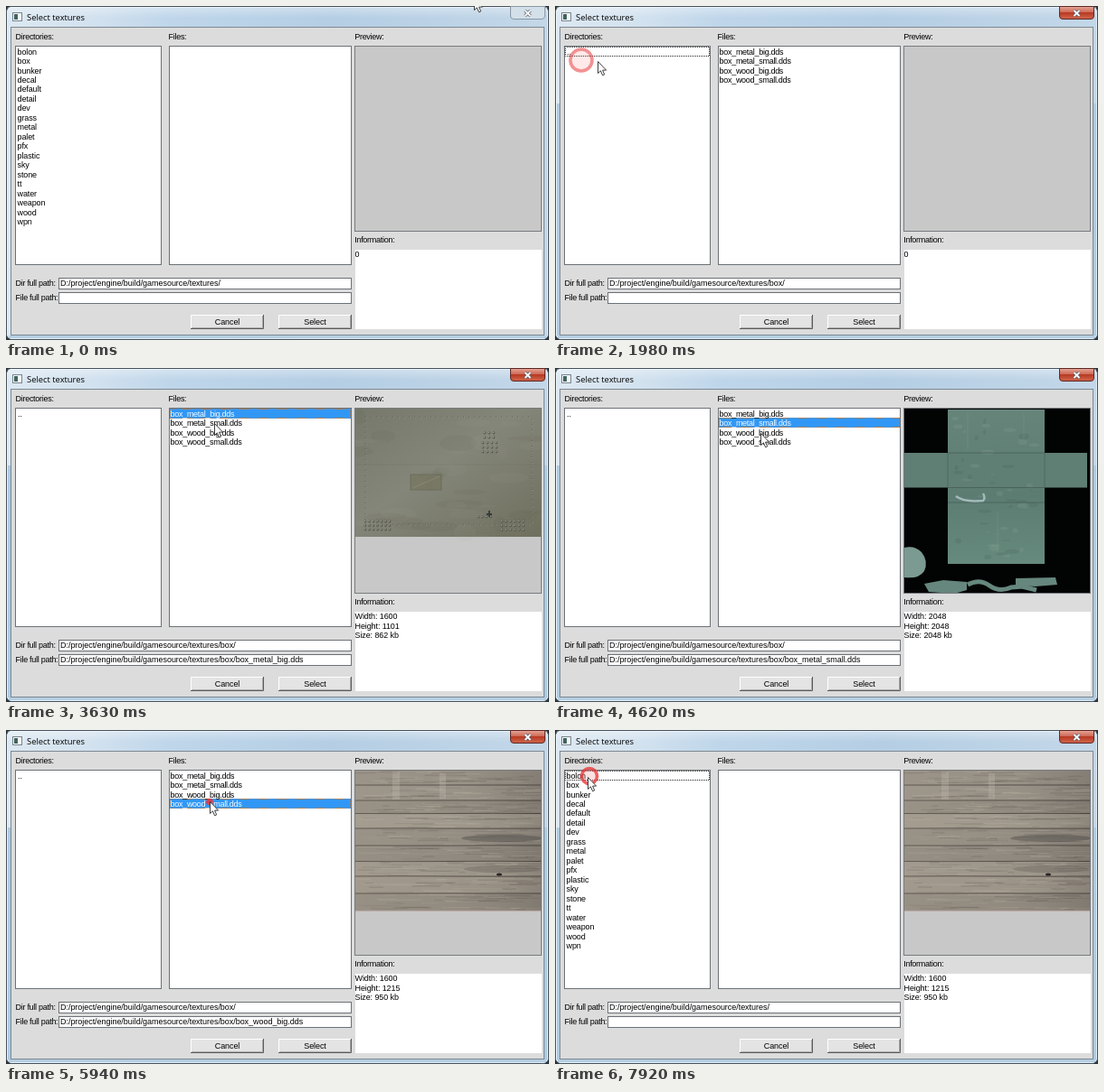
Recreate the animation shown at these times as an HTML page. Size 600 by 370 pixels, loop 8 s.

```html
<!DOCTYPE html>
<html lang="en">
<head>
<meta charset="utf-8">
<title>Select textures</title>
<style>
html, body { margin: 0; width: 100%; height: 100%; overflow: hidden; background: #2b343b; }
svg { display: block; width: 600px; height: 370px; }
text { font: 9px "Liberation Sans", Arial, sans-serif; fill: #000; white-space: pre; }
.title { font: 9.4px "Open Sans", "Noto Sans", sans-serif; }
.label { letter-spacing: -.28px; }
.dir { letter-spacing: -.1px; }
.path { letter-spacing: -.04px; }
.dots { fill: none; stroke-dasharray: 1 1; stroke-dashoffset: .5; }
</style>
</head>
<body>
<svg id="stage" viewBox="0 0 600 370" xmlns="http://www.w3.org/2000/svg">
<defs>
  <linearGradient id="bar">
    <stop offset="0" stop-color="#dce8f2"/><stop offset=".15" stop-color="#d3e2ef"/>
    <stop offset=".3" stop-color="#bfd6ea"/><stop offset=".6" stop-color="#b5cee4"/>
    <stop offset="1" stop-color="#c3d7e8"/>
  </linearGradient>
  <linearGradient id="gloss" x2="0" y2="1">
    <stop offset="0" stop-color="#fff" stop-opacity=".35"/><stop offset="1" stop-color="#fff" stop-opacity="0"/>
  </linearGradient>
  <linearGradient id="red" x2="0" y2="1">
    <stop offset="0" stop-color="#e5a698"/><stop offset=".45" stop-color="#cf6a57"/>
    <stop offset=".5" stop-color="#b83a24"/><stop offset="1" stop-color="#d0674c"/>
  </linearGradient>
  <linearGradient id="steel" x2="1" y2="1">
    <stop offset="0" stop-color="#75786a"/><stop offset=".45" stop-color="#838679"/>
    <stop offset="1" stop-color="#706f5e"/>
  </linearGradient>
  <linearGradient id="green" x2="0" y2="1">
    <stop offset="0" stop-color="#66847a"/><stop offset=".55" stop-color="#5c7c72"/>
    <stop offset="1" stop-color="#668a7d"/>
  </linearGradient>
  <linearGradient id="shade">
    <stop offset="0" stop-color="#cfc4b2" stop-opacity=".16"/>
    <stop offset=".5" stop-color="#cfc4b2" stop-opacity=".08"/>
    <stop offset="1" stop-color="#3a3430" stop-opacity=".16"/>
  </linearGradient>
  <clipPath id="view"><rect x="386" y="44" width="206" height="206"/></clipPath>
</defs>
</svg>
<script>
const STEP = 330, LOOP = 8000;
const svg = document.getElementById('stage');
const ROOT = 'D:/project/engine/build/gamesource/textures/';
const DIRS = 'bolon box bunker decal default detail dev grass metal palet pfx plastic sky stone tt water weapon wood wpn'.split(' ');
const FILES = ['metal_big', 'metal_small', 'wood_big', 'wood_small'].map(n => `box_${n}.dds`);
const rowY = i => 53.6 + i * 10.47;

const rect = (x, y, w, h, fill, more = '') =>
  `<rect x="${x}" y="${y}" width="${w}" height="${h}" fill="${fill}" ${more}/>`;
const line = (d, color, width = 1, more = '') =>
  `<path d="${d}" fill="none" stroke="${color}" stroke-width="${width}" ${more}/>`;
const text = (x, y, s, cls = 'label', more = '') =>
  `<text x="${x}" y="${y}" class="${cls}" ${more}>${s}</text>`;
const field = (x, y, w, h) => rect(x + .5, y + .5, w, h, '#fff', 'stroke="#6c7176"');
const group = (id, body, more = '') => `<g id="${id}" ${more}>${body}</g>`;

function random(seed) {
  return () => (seed = seed * 16807 % 2147483647) / 2147483647;
}

function button(x, w, label) {
  return rect(x, 342, w, 16, '#e4e4e4') +
    line(`M${x + .5} 357V342.5H${x + w - 1}`, '#fff') +
    line(`M${x} 357.5H${x + w - .5}V342`, '#5c5c5c') +
    line(`M${x + 1} 356.5H${x + w - 1.5}V343`, '#aaa') +
    text(x + w / 2, 353, label, 'dir', 'text-anchor="middle"');
}

function metalBig() {
  const rnd = random(71);
  let s = rect(386, 44, 206, 143, 'url(#steel)');
  for (let i = 0; i < 34; i++)
    s += `<ellipse cx="${386 + rnd() * 206}" cy="${44 + rnd() * 143}" rx="${4 + rnd() * 24}" ry="${1 + rnd() * 9}" fill="${rnd() < .5 ? '#a0a294' : '#57543e'}" opacity=".08"/>`;
  s += rect(397, 54, 184, 119, 'none', 'stroke="#5f6052" stroke-dasharray="1 5" opacity=".8"');
  s += rect(398, 55, 184, 119, 'none', 'stroke="#9b9d8f" stroke-dasharray="1 5" opacity=".6"');
  s += rect(447, 118, 34, 17, '#76745f', 'stroke="#5f5f4e" stroke-width=".8" opacity=".7"');
  s += line('M449 133L479 120', '#8f8f7d', .7);
  const rivets = (x, y, nx, ny, gap) => {
    for (let i = 0; i < nx * ny; i++) {
      const cx = x + i % nx * gap, cy = y + Math.floor(i / nx) * gap;
      s += `<circle cx="${cx}" cy="${cy}" r="1.4" fill="#56584d"/><circle cx="${cx - .4}" cy="${cy - .5}" r=".8" fill="#9d9f91"/>`;
    }
  };
  rivets(529, 72, 3, 2, 5);
  rivets(527, 83, 4, 3, 5);
  rivets(397, 170, 7, 3, 4.5);
  rivets(548, 170, 6, 3, 4.8);
  rivets(522, 165, 4, 1, 4.5);
  return s + line('M534 158V165M531 162H537', '#353b3c', 1.8) +
    line('M386 107H591', '#686a5c', .6, 'opacity=".4"');
}

function metalSmall() {
  const rnd = random(23);
  let s = rect(386, 44, 206, 206, '#020303') +
    rect(434, 46, 107, 171, 'url(#green)') + rect(386, 94, 202, 38.5, '#5f7e74');
  for (let i = 0; i < 46; i++)
    s += `<ellipse cx="${442 + rnd() * 90}" cy="${52 + rnd() * 158}" rx="${1 + rnd() * 7}" ry="${.5 + rnd() * 3}" fill="${rnd() < .5 ? '#93aaa3' : '#405b53'}" opacity=".18"/>`;
  s += line('M434 94H541M434 132.5H541M434 149H541', '#465f56', .8) +
    line('M434 94V132M541 94V132', '#49645b', .7) +
    line('M443 142Q452 149 473 147Q476 144 473 139', '#bccfd2', 2.4, 'opacity=".75"') +
    line('M456 48V90M518 50V78M489 160V205', '#88a098', .6, 'opacity=".5"');
  s += '<path d="M386 199Q397 196 405 204Q413 214 408 225Q402 234 386 232Z" fill="#7b9a91"/>';
  s += '<path d="M408 239L429 235L455 237V246L441 250L413 248ZM509 233L553 232L555 240L531 242L509 241Z" fill="#66877d"/>';
  s += line('M456 240Q469 233 480 241T504 243L516 242L532 246', '#66877d', 5);
  return s;
}

function wood() {
  const rnd = random(9);
  const tops = [44, 61, 78, 92.5, 109, 128, 145.5, 162, 181, 200];
  const tones = ['#928b81', '#958e84', '#8f887e', '#9c9589', '#8f897f', '#8b857c', '#9a9388', '#999186', '#8d867c'];
  let s = '';
  tones.forEach((tone, i) => {
    const y = tops[i], h = tops[i + 1] - y;
    s += rect(386, y, 206, h, tone);
    for (let k = 0; k < 36; k++) {
      const x = 386 + rnd() * 190, ly = y + 1 + rnd() * (h - 2), w = 6 + rnd() * 50;
      s += line(`M${x} ${ly}q${w / 2} ${rnd() * 2 - 1} ${w} 0`, rnd() < .5 ? '#c2b9aa' : '#57504a', .4 + rnd(), 'opacity=".26"');
    }
    if (i) s += line(`M386 ${y}q50 ${rnd() - .5} 100 0t106 0`, '#453e39', .9);
  });
  s += rect(386, 44, 206, 156, 'url(#shade)');
  s += '<ellipse cx="548" cy="120" rx="45" ry="4" fill="#45413f" opacity=".4"/>';
  s += '<ellipse cx="548" cy="154" rx="42" ry="4" fill="#4d4844" opacity=".25"/>';
  s += '<path d="M427 46H435V77H427ZM479 48H486V76H479Z" fill="#cbc4b8" opacity=".25"/>';
  s += '<ellipse cx="545" cy="160" rx="3" ry="1.6" fill="#292422"/>';
  return s + line('M386 200.3H592', '#b3a29c', 1);
}

const closeShape = 'M557.5 .5V11Q557.5 14.5 561 14.5H592Q595.5 14.5 595.5 11V.5Z';
const closeCross = 'M573.5 5L579.5 11M579.5 5L573.5 11';

svg.insertAdjacentHTML('beforeend',
  rect(.5, .5, 599, 369, 'url(#bar)', 'rx="6" stroke="#46525c"') +
  rect(1.5, 1.5, 597, 367, 'none', 'rx="5" stroke="#e9f2f9" opacity=".7"') +
  rect(2, 1, 596, 12, 'url(#gloss)') +
  group('sides', rect(2, 108, 4, 257, '#aecbe1') + rect(595, 108, 3, 257, '#aecbe1')) +
  rect(3, 365, 594, 3, '#b5cee2') +
  rect(5.5, 23.5, 589, 341, '#dcdcdc', 'stroke="#7d8891"') +
  rect(7.5, 7.5, 10, 9, '#f7f9fa', 'stroke="#77858e"') + rect(9, 9, 4, 6, '#3f645f') +
  text(23, 15.5, 'Select textures', 'title') +
  group('closeOff', `<path d="${closeShape}" fill="#d3dfe9" stroke="#8a98a5"/>`) +
  group('closeOn', `<path d="${closeShape}" fill="url(#red)" stroke="#5e2a26"/>`) +
  line(closeCross, '#505a64', 3.2) + line(closeCross, '#fff', 1.8) +
  text(10.5, 37, 'Directories:') + text(179.5, 37, 'Files:') + text(385.2, 37, 'Preview:') +
  text(385.2, 262, 'Information:') +
  text(10.5, 310.3, 'Dir full path:') + text(10.5, 326.3, 'File full path:') +
  field(10, 44, 161, 242) + field(180, 44, 201, 242) +
  field(58, 301, 323, 12) + field(58, 317, 323, 12) +
  rect(386, 270, 206, 88, '#fff') +
  button(204, 81, 'Cancel') + button(301, 81, 'Select') +
  rect(386, 44, 206, 206, '#c8c8c8') +
  group('pic0', metalBig(), 'clip-path="url(#view)"') +
  group('pic1', metalSmall(), 'clip-path="url(#view)"') +
  group('pic2', wood(), 'clip-path="url(#view)"') +
  rect(385.5, 44.5, 206, 205, 'none', 'stroke="#777b7e"') +
  group('dirs', DIRS.map((d, i) => text(12.5, rowY(i), d, 'dir')).join('')) +
  group('up', text(13, rowY(0), '..', 'dir')) +
  group('focus', rect(11.5, 45.5, 159, 10, 'none', 'class="dots" stroke="#222"')) +
  group('mark', rect(181, 45, 200, 11, '#3197f6') +
    rect(181.5, 45.5, 199, 10, 'none', 'class="dots" stroke="#c87a35"')) +
  group('files', FILES.map((f, i) => text(181.5, rowY(i), f)).join('')) +
  text(60, 310.3, '', 'path', 'id="dirPath"') + text(60, 326.3, '', 'path', 'id="filePath"') +
  [0, 1, 2].map(i => text(385.5, 278 + i * 10.5, '', 'dir', `id="info${i}"`)).join('') +
  '<circle id="ring"/>' +
  '<path id="cursor" d="M.5 .5V13.6L3.4 10.8L5.6 15.8L7.7 14.9L5.6 10.1H9.6Z" fill="#fff" stroke="#2c2c2c" stroke-width=".9"/>');

const ui = {};
svg.querySelectorAll('[id]').forEach(e => ui[e.id] = e);
const show = (e, on) => e.setAttribute('display', on ? 'inline' : 'none');
const set = (e, attrs) => { for (const k in attrs) e.setAttribute(k, attrs[k]); };

// Latest value whose step has been reached
const at = (keys, n) => keys.filter(k => k[0] <= n).pop()[1];

const PATH = [
  [0, 517, -9], [3, 215, 56], [5, 26, 60], [6, 47, 61], [7, 110, 57], [9, 232, 50], [10, 232, 52],
  [11, 230, 61], [13, 229, 63], [14, 227, 72], [16, 226, 73], [18, 225, 79], [20, 224, 79],
  [22, 150, 70], [23, 40, 51], [24, 36, 52]
];
const SELECTED = [[0, -1], [10, 0], [13, 1], [15, 2], [18, 3], [24, -1]];
const OPENED = [[0, -1], [10, 0], [13, 1], [16, 2], [19, 3], [24, -1]];
const PICTURE = [[0, -1], [10, 0], [13, 1], [16, 2]];
const INFO = [[1600, 1101, 862], [2048, 2048, 2048], [1600, 1215, 950]];
// step, x, y, radius, opacity
const CLICKS = [
  [5, 27, 60, 7, .85], [6, 29, 60, 12, .55], [9, 232, 50, 4, .85], [12, 230, 62, 4, .85],
  [15, 227, 72, 4, .85], [18, 225, 79.5, 2, .9], [23, 40, 51, 4, .85], [24, 38, 51, 8.5, .8]
];

function cursorAt(n) {
  const i = Math.max(0, PATH.findIndex(p => p[0] >= n) - 1);
  const [a, ax, ay] = PATH[i], [b, bx, by] = PATH[i + 1];
  const k = (n - a) / (b - a);
  return [ax + (bx - ax) * k, ay + (by - ay) * k];
}

function draw(n) {
  const inBox = n >= 6 && n < 24;
  show(ui.closeOff, n === 0);
  show(ui.closeOn, n > 0);
  show(ui.sides, n > 0);
  show(ui.dirs, !inBox);
  show(ui.up, inBox);
  show(ui.files, inBox);
  show(ui.focus, (n >= 5 && n < 10) || n >= 23);
  set(ui.focus, { transform: `translate(0 ${n === 5 ? 10.5 : 0})` });

  const sel = at(SELECTED, n);
  show(ui.mark, sel >= 0);
  set(ui.mark, { transform: `translate(0 ${Math.round(sel * 10.47)})` });
  [...ui.files.children].forEach((e, i) => e.style.fill = i === sel ? '#f4faff' : '');

  const dir = ROOT + (inBox ? 'box/' : ''), open = at(OPENED, n);
  ui.dirPath.textContent = dir;
  ui.filePath.textContent = open < 0 ? '' : dir + FILES[open];

  const pic = at(PICTURE, n);
  for (let i = 0; i < 3; i++) show(ui['pic' + i], i === pic);
  const [w, h, kb] = INFO[pic] || [];
  const lines = pic < 0 ? ['0', '', ''] : [`Width: ${w}`, `Height: ${h}`, `Size: ${kb} kb`];
  lines.forEach((s, i) => ui['info' + i].textContent = s);

  const click = CLICKS.find(c => c[0] === n);
  show(ui.ring, click);
  if (click) {
    const [, cx, cy, r, opacity] = click;
    set(ui.ring, { cx, cy, r, opacity, fill: r < 5 ? '#e33' : '#ff8a8a55', stroke: '#e8383a', 'stroke-width': 3.6 });
  }
  set(ui.cursor, { transform: `translate(${cursorAt(n)})` });
}

let last = -1;
function tick() {
  const n = Math.floor(performance.now() % LOOP / STEP);
  if (n !== last) draw(last = n);
  requestAnimationFrame(tick);
}
tick();
</script>
</body>
</html>
```
